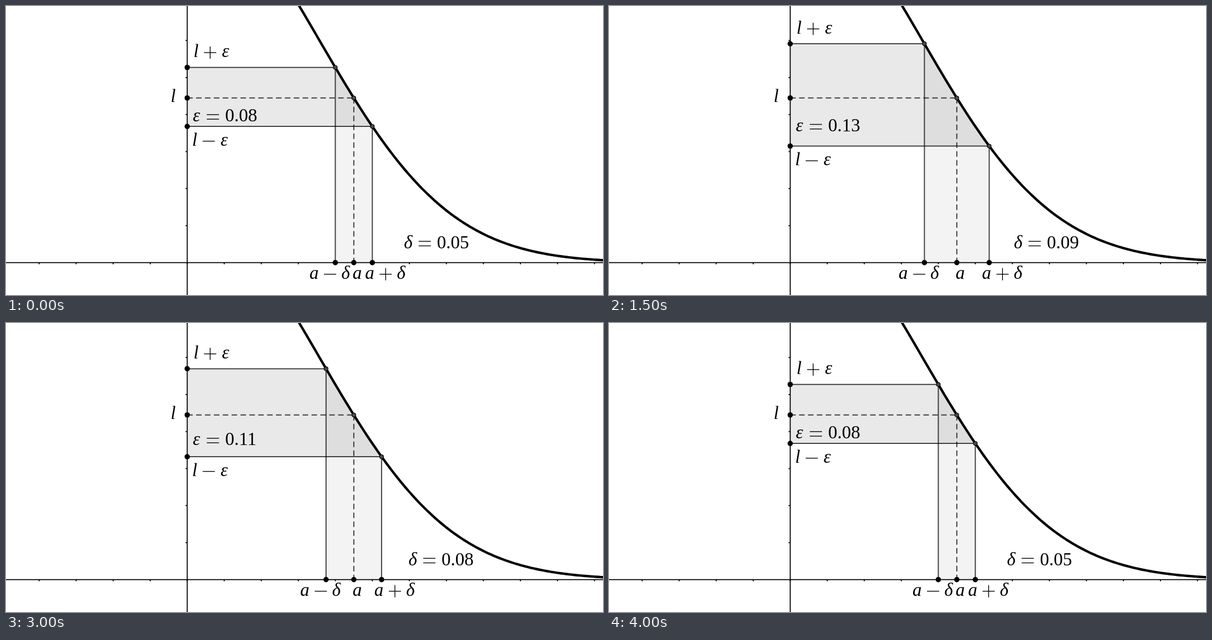
Recreate the animation shown at these times as an HTML page with a canvas. Size 1076 px wide and 521 px high, loop 4.1 s.

```html
<!DOCTYPE html>
<html lang="en">
<head>
<meta charset="utf-8">
<title>Epsilon and delta</title>
<style>
  html, body { margin: 0; width: 100%; height: 100%; overflow: hidden; background: #fff; }
  canvas { display: block; }
</style>
</head>
<body>
<canvas id="stage" width="1076" height="521"></canvas>
<script>
const ctx = document.getElementById("stage").getContext("2d");
const W = 1076, H = 521;
const X0 = 326.6, Y0 = 462.6, UNIT = 667.3;   // axes origin and pixels per unit
const EM = 33;                                // type size
const A = 0.45;
const STEP = 100, STEPS = 41;

const f = x => Math.exp(-4 * x * x);
const px = x => X0 + x * UNIT;
const py = y => Y0 - y * UNIT;

function line(x1, y1, x2, y2) {
  ctx.beginPath();
  ctx.moveTo(x1, y1);
  ctx.lineTo(x2, y2);
  ctx.stroke();
}

function dot(x, y, r, fill) {
  ctx.beginPath();
  ctx.arc(x, y, r, 0, 7);
  ctx.fillStyle = fill;
  ctx.fill();
}

// Adds the graph between two abscissas to the current path.
function graph(from, to) {
  const n = 120;
  for (let i = 0; i <= n; i++) {
    const x = from + (to - from) * i / n;
    ctx.lineTo(px(x), py(f(x)));
  }
}

// Fills the area between the graph and two corners on an axis.
function area(from, to, corners, alpha) {
  ctx.beginPath();
  graph(from, to);
  for (const [x, y] of corners) ctx.lineTo(x, y);
  ctx.fillStyle = `rgba(0,0,0,${alpha})`;
  ctx.fill();
}

// Widths of the cells in a formula, in ems.
const CELL = { l: 0.318, a: 0.529, "ε": 0.466, "δ": 0.47 };
const GAP = { "+": 0.222, "−": 0.222, "=": 0.278 };

function operator(op, x, y) {
  const mid = y - 0.25 * EM, half = 0.333 * EM;
  ctx.lineWidth = 1.4;
  ctx.strokeStyle = "#000";
  if (op === "=") {
    for (const d of [-4.1, 4.1]) line(x - half, mid + d, x + half, mid + d);
  } else {
    line(x - half, mid, x + half, mid);
    if (op === "+") line(x, mid - half, x, mid + half);
  }
}

// Sets a formula given as space-separated tokens, starting at x on baseline y.
function formula(text, x, y) {
  ctx.fillStyle = "#000";
  for (const token of text.split(" ")) {
    if (token in GAP) {
      const w = (0.778 + 2 * GAP[token]) * EM;
      operator(token, x + w / 2, y);
      x += w;
    } else if (token in CELL) {
      const w = CELL[token] * EM;
      ctx.font = `italic ${EM}px "Liberation Serif", serif`;
      ctx.textAlign = "center";
      ctx.fillText(token, x + w / 2, y);
      x += w;
    } else {
      ctx.font = `${EM}px "Liberation Serif", serif`;
      ctx.textAlign = "left";
      ctx.fillText(token, x, y);
    }
  }
}

function axes() {
  ctx.strokeStyle = "#000";
  ctx.lineWidth = 1.8;
  line(0, Y0, W, Y0);
  line(X0, 0, X0, H);
  for (let i = -4; i <= 11; i++) line(px(i / 10), Y0, px(i / 10), Y0 + 3);
  for (let i = 1; i <= 6; i++) line(X0 - 3, py(i / 10), X0, py(i / 10));
}

function draw(ms) {
  const k = Math.floor(ms / STEP) % STEPS;
  const n = k <= 20 ? k : 40 - k;
  const delta = 0.05 + n * 0.0025;
  const eps = f(A) - f(A + delta);
  const left = px(A - delta), mid = px(A), right = px(A + delta);
  const top = py(f(A - delta)), level = py(f(A)), low = py(f(A + delta));

  ctx.fillStyle = "#fff";
  ctx.fillRect(0, 0, W, H);
  area(A - delta, A + delta, [[X0, low], [X0, top]], 0.086);
  area(A - delta, A + delta, [[right, Y0], [left, Y0]], 0.047);
  axes();

  ctx.strokeStyle = "rgba(0,0,0,0.72)";
  ctx.lineWidth = 2;
  line(X0, top, left, top);
  line(left, top, left, Y0);
  line(X0, low, right, low);
  line(right, low, right, Y0);
  ctx.setLineDash([10, 6]);
  line(X0, level, mid, level);
  line(mid, level, mid, Y0);
  ctx.setLineDash([]);

  ctx.strokeStyle = "#000";
  ctx.lineWidth = 4.4;
  ctx.beginPath();
  graph(0.27, 1.14);
  ctx.stroke();

  for (const [x, y] of [[left, top], [mid, level], [right, low]]) {
    dot(x, y, 4.1, "#000");
    dot(x, y, 3, "#4a4a4a");
    dot(x, Y0, 4.8, "#000");
    dot(X0, y, 4.8, "#000");
  }

  formula("l + ε", 337.3, top - 18.5);
  formula("l", 296, level + 7);
  formula("l − ε", 334.8, low + 34.8);
  formula("ε = " + Math.round(eps * 100) / 100, 335.5, (level + low) / 2 + 16.7);
  formula("a − δ", left - 47, 491.8);
  formula("a", mid - 2.6, 491.8);
  formula("a + δ", right - 13.6, 491.8);
  formula("δ = " + Math.round((500 + 25 * n) / 100) / 100, 700.5 + delta * UNIT / 2, 436.6);
}

const start = performance.now();
function tick() {
  draw(performance.now() - start);
  requestAnimationFrame(tick);
}
tick();
</script>
</body>
</html>
```
